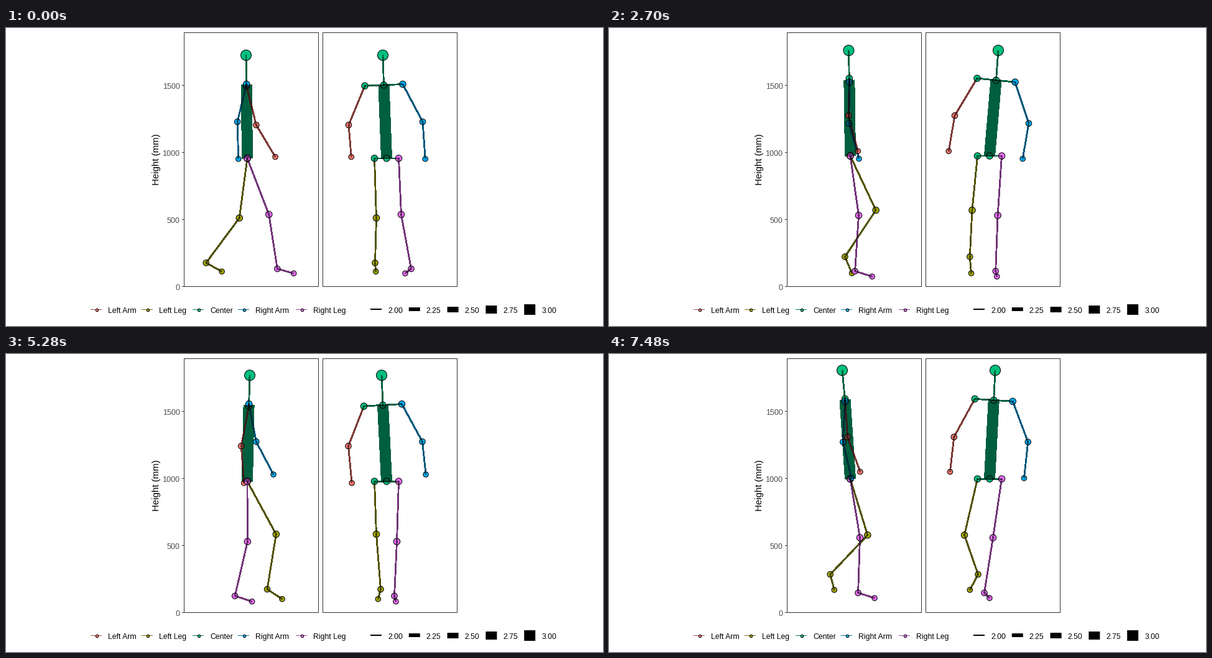
These frames come from a looping animation (960x480 px, 7.5 s). A matplotlib script:

```python
import numpy as np
import matplotlib.pyplot as plt
from matplotlib.animation import FuncAnimation
from matplotlib.collections import LineCollection
from matplotlib.patches import Rectangle

W, H, DPI = 960, 480, 100
FRAMES, STEP = 375, 20
PX = 72 / DPI  # one pixel in points
TIME = np.arange(FRAMES) * STEP

RED, OLIVE, GREEN, BLUE, PINK = "#F8766D", "#A3A500", "#00BF7D", "#00B0F6", "#E76BF3"
SIDE_X, FRONT_X = 388, 612  # pelvis in each view


def track(*values):
    """Drift through the values at the key times."""
    return np.interp(TIME, (0, 960, 1840, 3580, 5280, 6540, 7480), values)


def cycle(*samples):
    """Smooth periodic curve through evenly spaced angles of one stride."""
    n = len(samples)
    c = np.fft.rfft(samples) / n
    c[1:(n + 1) // 2] *= 2

    def curve(p):
        k = np.arange(len(c))
        return (c * np.exp(2j * np.pi * np.outer(p, k))).real.sum(axis=1)
    return curve


# Gait angles from vertical in degrees; phase 0 is heel strike.
thigh = cycle(24, 19, 10.5, 5.5, -1, -6, -5, 15, 28, 28)
shank = cycle(15, 4.5, -1, -9, -13.5, -24, -44, -45, -26, -4)
foot = cycle(77, 72, 72, 72, 72, 70, 48, 15, 35, 61)


def upper_arm(p):
    return -15 * np.cos(2 * np.pi * p)


def forearm(p):
    return 16 - 16 * np.cos(2 * np.pi * p)


def point(forward, down, across):
    return np.column_stack(np.broadcast_arrays(forward, down, across)).astype(float)


def extend(start, length, angle, across):
    """End of a rigid segment swung forward by angle and sideways by across."""
    reach = np.sqrt(length ** 2 - across ** 2)
    a = np.radians(angle)
    return start + point(reach * np.sin(a), reach * np.cos(a), across)


phase = {"r": track(0.07, 0.69, 1.52, 2.99, 4.38, 5.42, 6.22),
         "l": track(0.56, 1.31, 2.07, 3.47, 4.88, 5.92, 6.71)}
lean = track(-6, -4, 12, 16, -8, -3, 9)
pitch = track(-2, 11, -7, 2, 4, 2, -13)
knee_out = {"l": track(3, 20, -13, -4, 3, -5, -21), "r": track(4, 20, 1, -14, -3, -3, -14)}
ankle_out = {"l": track(1, 26, -33, 9, 10, -3, 1), "r": track(20, 7, 7, -27, -7, -7, -28)}


def bob(p):
    return 5 * np.cos(4 * np.pi * (p - 0.05))


height = (bob(phase["r"]) + track(39, 39, 42, 38, 37, 34, 29))
zero = np.zeros(FRAMES)

body = {
    "head": point(pitch, height, lean),
    "pelvis": point(zero, 208 + 0.5 * (height - 40), 0),
    "neck": point(0.65 * pitch, height + 48, 0.75 * lean),
}
for s, sign in (("l", -1), ("r", 1)):
    p = phase[s]
    shin_out = ankle_out[s] - knee_out[s]
    hip = body["pelvis"] + point(zero, 0, sign * 19.5)
    knee = extend(hip, 97, thigh(p), knee_out[s])
    ankle = extend(knee, 90, shank(p), shin_out)
    toe = extend(ankle, 29, foot(p), -0.6 * shin_out)
    shoulder = body["neck"] + point(zero, sign * 0.22 * lean, sign * 30.5)
    elbow = extend(shoulder, 70, upper_arm(p), sign * 29 - 0.5 * lean)
    wrist = extend(elbow, 60, forearm(p), -0.7 * lean)
    parts = dict(hip=hip, shoulder=shoulder, elbow=elbow, wrist=wrist,
                 knee=knee, ankle=ankle, toe=toe)
    body.update({f"{s}_{name}": xyz for name, xyz in parts.items()})

names = list(body)
xyz = np.stack(list(body.values()), axis=1)  # frame, joint, axis
pos = np.stack([xyz[..., [0, 1]] + (SIDE_X, 0),
                xyz[..., [2, 1]] + (FRONT_X, 0)], axis=1)  # frame, view, joint, xy


def tint(name):
    if name in ("head", "neck", "pelvis", "l_hip", "l_shoulder"):
        return GREEN
    arm = name[2:] in ("shoulder", "elbow", "wrist")
    if name[0] == "l":
        return RED if arm else OLIVE
    return BLUE if arm else PINK


def diameter(name):
    return {"head": 17, "elbow": 9.5, "ankle": 9.5, "wrist": 8.5,
            "toe": 8.5}.get(name.split("_")[-1], 10.5)


fills = [tint(n) for n in names]
sizes = [(diameter(n) * PX) ** 2 for n in names]

CHAINS = [
    (GREEN, 17, "neck pelvis"),
    (GREEN, 1.8, "head neck"),
    (GREEN, 1.8, "l_shoulder neck r_shoulder"),
    (GREEN, 1.8, "l_hip pelvis r_hip"),
    (RED, 1.8, "l_shoulder l_elbow l_wrist"),
    (OLIVE, 1.8, "l_hip l_knee l_ankle l_toe"),
    (BLUE, 1.8, "r_shoulder r_elbow r_wrist"),
    (PINK, 1.8, "r_hip r_knee r_ankle r_toe"),
]
bones, bone_colors, bone_widths = [], [], []
for color, width, chain in CHAINS:
    ids = [names.index(n) for n in chain.split()]
    for pair in zip(ids, ids[1:]):
        bones.append(pair)
        bone_colors.append(color)
        bone_widths.append(width * PX)
bones = np.array(bones)

plt.rcParams["font.family"] = "Liberation Sans"
fig = plt.figure(figsize=(W / DPI, H / DPI), dpi=DPI, facecolor="white")
ax = fig.add_axes([0, 0, 1, 1])
ax.set(xlim=(0, W), ylim=(H, 0))
ax.axis("off")


def strokes(segments, colors, widths, z, **kw):
    lines = LineCollection(segments, colors=colors, linewidths=widths, zorder=z,
                           capstyle="butt", snap=False, **kw)
    return ax.add_collection(lines, autolim=False)


def dots(xy, colors, areas, z):
    xy = np.asarray(xy)
    return ax.scatter(xy[:, 0], xy[:, 1], s=areas, c=colors, edgecolors="black",
                      linewidths=PX, zorder=z, snap=False)


def label(x, y, text, size=12.2, **kw):
    ax.text(x, y, text, fontsize=size * PX, **kw)


# panels and height axis
for x in (286.5, 509.5):
    ax.add_patch(Rectangle((x, 7.5), 216, 409, fill=False, ec="#333333", lw=PX, snap=False))
for i in range(4):
    y = 416.5 - 108 * i
    strokes([[(283, y), (286, y)]], "#333333", PX, 1)
    label(279.5, y + 5.5, str(500 * i), 12.5, color="#4D4D4D", ha="right")
label(242, 212, "Height (mm)", 15, rotation=90, ha="center", va="center")

# legends
groups = [(145, "Left Arm", RED), (227, "Left Leg", OLIVE), (309, "Center", GREEN),
          (382, "Right Arm", BLUE), (475, "Right Leg", PINK)]
for x, text, color in groups:
    key = [[(x - 9, 453.5), (x + 9, 453.5)]]
    strokes(key, color, PX, 1)
    strokes(key, "black", PX, 1.5, alpha=0.3)
    dots([(x + 0.5, 453.5)], [color], (4.5 * PX) ** 2, 2)
    label(x + 19, 459, text)
for i, width in enumerate((2, 6, 9, 13, 17)):
    x = 595 + 61.8 * i
    y = 453 + width % 2 / 2
    strokes([[(x - 9, y), (x + 9, y)]], "black", width * PX, 1)
    label(x + 19, 459, f"{2 + i / 4:.2f}")


def limbs(k):
    return pos[k][:, bones].reshape(-1, 2, 2)


def points(k):
    return pos[k].reshape(-1, 2)


base = strokes(limbs(0), bone_colors * 2, bone_widths * 2, 4, antialiaseds=False)
marks = dots(points(0), fills * 2, sizes * 2, 5)
shade = strokes(limbs(0), "black", bone_widths * 2, 6, alpha=0.5, antialiaseds=False)


def update(k):
    base.set_segments(limbs(k))
    shade.set_segments(limbs(k))
    marks.set_offsets(points(k))
    return base, marks, shade


anim = FuncAnimation(fig, update, frames=FRAMES, interval=STEP, repeat=True)
plt.show()
```
